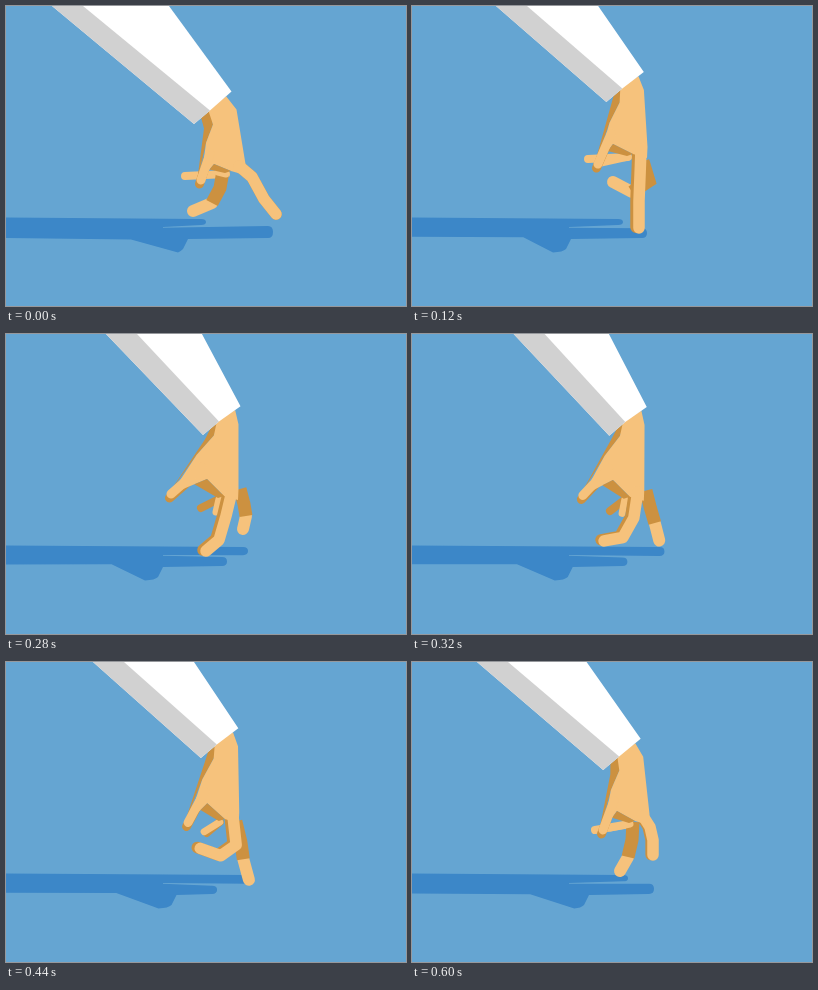
Recreate the animation shown at these times as an HTML page. Size 400 px wide and 300 px high, loop 0.64 s.

```html
<!DOCTYPE html>
<html lang="en">
<head>
<meta charset="utf-8">
<title>Walking fingers</title>
<style>
  html, body { margin: 0; width: 100%; height: 100%; overflow: hidden; background: #65a5d2; }
  svg { display: block; width: 100%; height: 100%; }
</style>
</head>
<body>
<svg id="stage" viewBox="0 0 400 300"></svg>
<script>
const LOOP = 640, STEP = 40;
const SKIN = '#f6c27c', SHADE = '#cc9140';

// Key poses: joints from knuckle to tip, and x positions of the shadow's
// two finger tips and its fist. Everything else follows from these.
const poses = [
  { time: 0, front: [233,160, 246,171, 258,193, 270,208], back: [217,165, 214,182, 206,197], tip: [187,205],
    apex: [208,158], thumb: [195,174], ring: [212,166], pinky: [179,170], shadow: [200, 267, 177] },
  { time: 120, front: [229,143, 228,170, 227,195, 227,222], back: [231,155, 237,175, 220,186], tip: [201,176],
    apex: [201,138], thumb: [186,158], ring: [189,157], pinky: [176,153], shadow: [211, 235, 154] },
  { time: 200, front: [228,143, 226,170, 223,195, 223,222], back: [231,155, 238,174, 220,186], tip: [204,177],
    apex: [201,134], thumb: [175,155], ring: [204,166], pinky: [190,150], shadow: [215, 233, 152] },
  { time: 280, front: [226,157, 220,182, 213,206, 200,217], back: [234,155, 238,170, 240,182], tip: [237,195],
    apex: [201,145], thumb: [165,160], ring: [210,178], pinky: [195,174], shadow: [242, 221, 152] },
  { time: 360, front: [226,156, 225,184, 211,199, 189,197], back: [233,158, 238,178, 242,196], tip: [251,215],
    apex: [201,145], thumb: [178,162], ring: [208,178], pinky: [200,176], shadow: [257, 212, 160] },
  { time: 520, front: [228,149, 235,179, 222,188, 207,181], back: [226,160, 230,180, 230,196], tip: [229,216],
    apex: [202,139], thumb: [185,160], ring: [190,162], pinky: [198,166], shadow: [234, 216, 170] },
  { time: 600, front: [231,154, 238,165, 241,178, 241,193], back: [221,160, 220,178, 216,195], tip: [208,209],
    apex: [205,149], thumb: [191,168], ring: [198,166], pinky: [183,168], shadow: [216, 242, 172] }
];

// Sleeve: x of its lower edge at the top of the stage, y of the lower cuff corner.
// The arm returns along the same way in the second half.
const armOut = [[0, 46, 118], [40, 65, 108], [120, 84, 96], [200, 87, 96], [280, 100, 101]];
const armKeys = [...armOut, ...armOut.slice(1).reverse().map(([t, ...v]) => [LOOP - t, ...v])];

// Smooth cyclic interpolation through unevenly spaced [time, values] keys.
function sampler(keys) {
  const n = keys.length;
  const key = i => {
    const turn = Math.floor(i / n), [t, values] = keys[i - turn * n];
    return [t + turn * LOOP, values];
  };
  return time => {
    let i = n - 1;
    while (keys[i][0] > time) i--;
    const [[t0, a], [t1, b], [t2, c], [t3, d]] = [key(i - 1), key(i), key(i + 1), key(i + 2)];
    const span = t2 - t1, u = (time - t1) / span, w = 1 - u;
    return b.map((p, k) => {
      const m1 = (c[k] - a[k]) / (t2 - t0) * span;
      const m2 = (d[k] - p) / (t3 - t1) * span;
      return p * w * w * (1 + 2 * u) + c[k] * u * u * (3 - 2 * u) + m1 * u * w * w - m2 * u * u * w;
    });
  };
}

const sampleArm = sampler(armKeys.map(([t, ...v]) => [t, v]));
const partNames = Object.keys(poses[0]).filter(name => name !== 'time');
const samplers = partNames.map(name => [name, sampler(poses.map(pose => [pose.time, pose[name]]))]);
const samplePose = time => Object.fromEntries(samplers.map(([name, sample]) => [name, sample(time)]));

const stage = document.getElementById('stage');
function layer(style) {
  const path = document.createElementNS('http://www.w3.org/2000/svg', 'path');
  for (const name in style) path.setAttribute(name, style[name]);
  return stage.appendChild(path);
}
const area = fill => layer({ fill });
const limb = (stroke, width, cap = 'round', join = 'round') => layer({
  fill: 'none', stroke, 'stroke-width': width, 'stroke-linecap': cap, 'stroke-linejoin': join
});

// Back to front.
const shadow = area('#3c87c8');
const pinky = limb(SKIN, 8);
const backTip = limb(SKIN, 12);
const back = limb(SHADE, 13, 'butt', 'miter');
const ring = limb(SKIN, 7);
const wrist = area(SHADE);
const thumbEdge = limb(SHADE, 9);
const frontEdge = limb(SHADE, 11.5);
const palm = area(SKIN);
const wedge = area(SHADE);
const thumb = limb(SKIN, 9);
const front = limb(SKIN, 11.5);
const sleeve = area('#fff');
const fold = area('#d1d1d1');

const add = ([x, y], dx, dy) => [x + dx, y + dy];
const mix = (a, b, k) => [a[0] + (b[0] - a[0]) * k, a[1] + (b[1] - a[1]) * k];
const shift = (points, dx, dy) => points.map((v, i) => v + (i % 2 ? dy : dx));
const line = (path, ...points) => path.setAttribute('d', 'M' + points.flat().join(' '));
const fill = (path, ...points) => path.setAttribute('d', 'M' + points.flat().join(' ') + 'Z');

function drawShadow([upper, lower, fist], swing) {
  const rounded = (x, top, bottom) =>
    `L${x - 5} ${top}Q${x} ${top} ${x} ${(top + bottom) / 2}Q${x} ${bottom} ${x - 5} ${bottom}`;
  const upperBottom = 219 + Math.max(0, upper - 211) / 14;
  const lowerTop = 220 + (267 - lower) / 15;
  const heel = fist - 5 - Math.min(8, swing / 4);
  shadow.setAttribute('d', `M0 211.5${rounded(upper, 213, upperBottom)}L157 221V221.7` +
    `${rounded(lower, lowerTop, 232)}L${fist + 5} 233L${fist} 243` +
    `Q${fist - 3} 246 ${heel} 246.5L${125 - swing * 0.36} ${233.5 - swing * 0.06}L0 ${232 - swing * 0.03}Z`);
}

function render(time) {
  const [foldX, cuffY] = sampleArm(time);
  const pose = samplePose(time);
  const swing = foldX - 46;

  const low = [188 + swing / 6, cuffY];
  const seam = add(low, 16, -13.6);
  const end = add(seam, 21.5, -19 + swing * 0.07);
  const foldTop = [foldX, 0], seamTop = [foldX + 31, 0], farTop = [foldX + 117 - swing * 0.39, 0];
  fill(sleeve, seamTop, farTop, end, seam, low, foldTop);
  fill(fold, foldTop, seamTop, seam, low);

  const knuckle = pose.front.slice(0, 2);
  const crotch = add(knuckle, -8, 5);
  const curlBase = add(crotch, -5, 3);
  const heel = add(seam, 3 - swing * 0.15, 14);
  const side = add(mix(heel, pose.thumb, 0.33), -3, 0);
  const thumbLine = [...mix(side, pose.apex, 0.5), ...pose.thumb];

  fill(palm, add(seam, -2, -1), mix(seam, end, 0.75), add(end, 5 - swing * 0.13, 18),
    add(knuckle, 6.5, -2), add(knuckle, 6, 9), crotch, pose.apex, pose.thumb, side, heel);
  fill(wrist, mix(low, seam, 0.45), add(heel, -9, 4), add(pose.thumb, -4, 2), side, heel, seam);
  fill(wedge, pose.apex, crotch, add(crotch, -6, 2), mix(pose.apex, pose.thumb, 0.35));

  line(thumb, thumbLine);
  line(thumbEdge, shift(thumbLine, -1.5, 4));
  line(ring, pose.ring, curlBase);
  line(pinky, pose.pinky, curlBase);
  pinky.setAttribute('stroke', pose.pinky[0] < pose.thumb[0] ? SKIN : SHADE);
  line(back, pose.back);
  line(backTip, pose.back.slice(-2), pose.tip);
  line(front, pose.front);
  line(frontEdge, shift(pose.front, -3 * Math.min(1, swing / 30), -swing / 50));

  drawShadow(pose.shadow, swing);
}

let start;
function tick(now) {
  start ??= now;
  render(Math.floor((now - start) % LOOP / STEP) * STEP);
  requestAnimationFrame(tick);
}
render(0);
requestAnimationFrame(tick);
</script>
</body>
</html>
```
